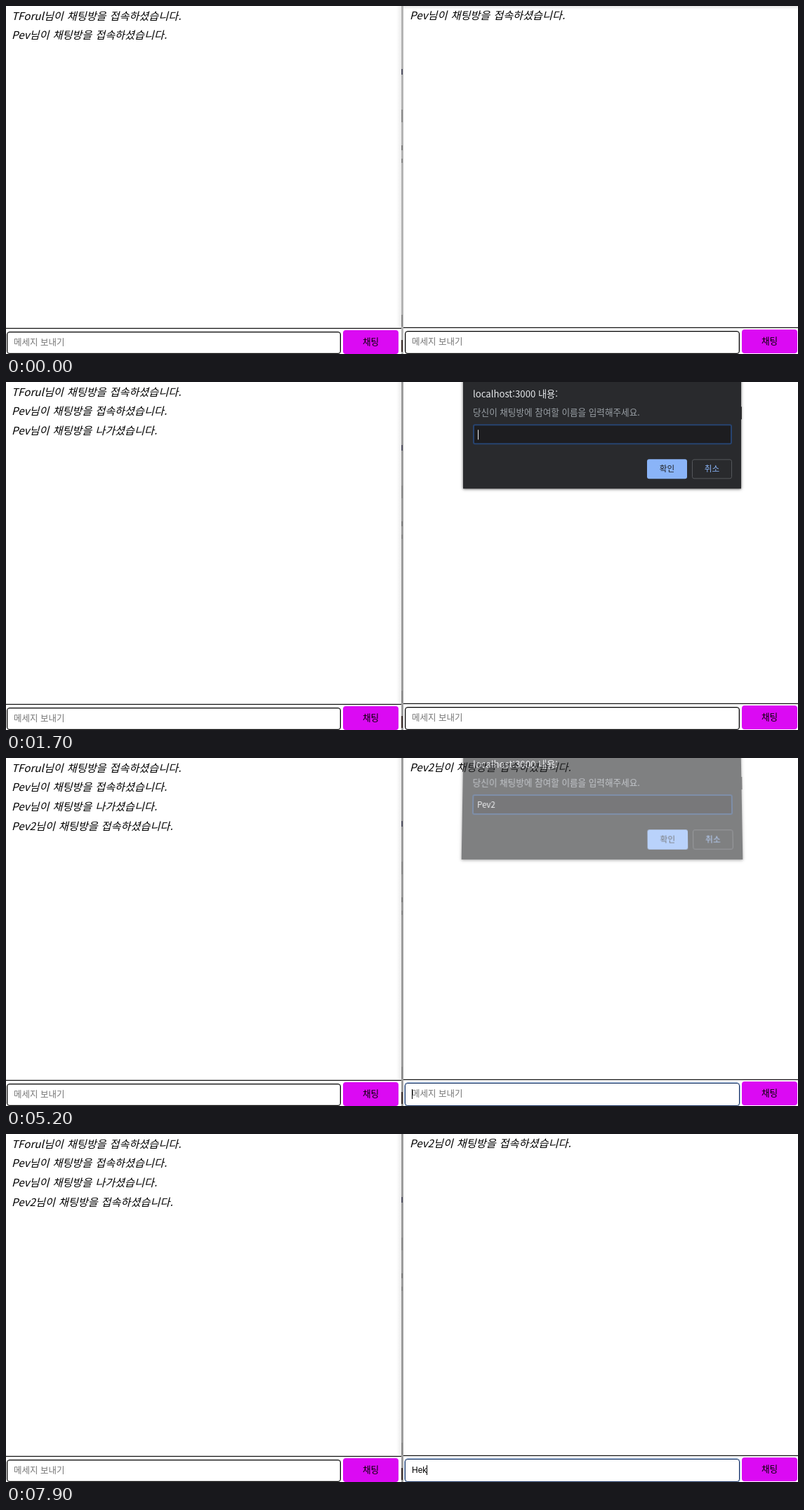
Write an HTML page that moves like this. It is 1128 px wide and 497 px high and loops after 8 s.

```html
<!DOCTYPE html>
<html lang="ko">
<head>
<meta charset="utf-8">
<title>채팅</title>
<style>
  html, body { margin: 0; width: 100%; height: 100%; overflow: hidden; background: #fff; }
  body { position: relative; font-family: "Noto Sans CJK KR", "Noto Sans CJK", "Noto Sans", sans-serif; }
  div { position: absolute; box-sizing: border-box; white-space: pre; }

  .pane { top: 0; height: 497px; }
  #left { left: 0; top: 1px; width: 564px; --field: 476px; --tall: 32px; }
  #right { left: 567px; width: 561px; --field: 477px; --tall: 33px; }
  .log { left: 8px; top: -1.5px; font: italic 15.2px/27.7px "Noto Sans CJK KR", "Noto Sans CJK", sans-serif; word-spacing: .04em; color: #000; }
  .rule { left: 0; top: 459px; width: 100%; height: 1px; background: #111; box-shadow: 0 -.5px #0006; }
  #right .rule { left: -1px; width: 562px; }
  .field { left: 1px; top: 464px; width: var(--field); height: var(--tall); border: 1px solid #000; border-radius: 4px; box-shadow: inset 0 0 0 .5px #0008; }
  .field.focus { border-color: #16305f; box-shadow: 0 0 0 .5px #4d7fc4; }
  .hint { left: 9px; top: 0; font-size: 12.5px; line-height: 28px; color: #757575; }
  .typed { left: 9px; top: 0; font: 12px/30px "Liberation Sans", Arial, sans-serif; color: #000; }
  .send { left: calc(var(--field) + 4px); top: 462px; width: 79px; height: 34px; border-radius: 4px; background: #db0af3; font-size: 12.6px; line-height: 32px; text-align: center; color: #000; }
  .caret { display: inline-block; width: 1px; height: 14px; margin-right: -1px; vertical-align: -3px; background: currentColor; }

  #edge { left: 556px; top: 0; width: 7px; height: 459px; background: linear-gradient(90deg, #fff, #ececec); }
  #bar { left: 563px; top: 0; width: 3px; height: 497px; }
  .speck { left: 563px; width: 2px; }
  #shade { left: 566px; top: 0; width: 562px; height: 5px; background: linear-gradient(#e6e6e6, #fff); }

  #dialog { left: 651px; top: -40px; width: 396px; height: 193px; background: #292a2d; box-shadow: 0 1px 4px #0009; transform-origin: 198px 60px; }
  #dialog .notch { left: 396px; top: 76px; width: 1px; height: 18px; background: #333; }
  #title { left: 14px; top: 48px; font-size: 13.2px; line-height: 20px; color: #e8eaed; }
  #ask { left: 14px; top: 74px; font-size: 12.6px; line-height: 20px; color: #9aa0a6; }
  #name { left: 14px; top: 101px; width: 369px; height: 29px; border: 2px solid #27436f; border-radius: 3px; background: #1d1d20; }
  #name div { left: 5px; top: 0; font-size: 11.4px; line-height: 24px; color: #e8eaed; }
  .key { top: 151px; width: 57px; height: 28px; border-radius: 3px; font-size: 11.6px; line-height: 26px; text-align: center; }
  #ok { left: 262px; background: #8ab4f8; color: #202124; line-height: 27px; }
  #cancel { left: 326px; border: 1px solid #54575b; color: #8ab4f8; line-height: 25px; }
</style>
</head>
<body>
<div id="left" class="pane"></div>
<div id="edge"></div>
<div id="bar"></div>
<div class="speck" style="top:90px;height:8px;background:#556"></div>
<div class="speck" style="top:148px;height:18px;background:#8c8c8c"></div>
<div class="speck" style="top:199px;height:7px;background:#808080"></div>
<div class="speck" style="top:218px;height:6px;background:#8a8a8a"></div>
<div class="speck" style="top:441px;height:17px;background:#8c8c8c"></div>
<div class="speck" style="top:477px;height:17px;background:#3a2c2a"></div>
<div id="right" class="pane"></div>
<div id="shade"></div>
<div id="dialog">
  <div class="notch"></div>
  <div id="title">localhost:3000 내용:</div>
  <div id="ask">당신이 채팅방에 참여할 이름을 입력해주세요.</div>
  <div id="name"><div></div></div>
  <div id="ok" class="key">확인</div>
  <div id="cancel" class="key">취소</div>
</div>
<script>
const LOOP = 8000;
const $ = s => document.querySelector(s);
const joined = n => `${n}님이 채팅방을 접속하셨습니다.`;
const exited = n => `${n}님이 채팅방을 나가셨습니다.`;

for (const id of ['#left', '#right']) {
  $(id).innerHTML = `<div class="log"></div><div class="rule"></div>
    <div class="field"><div class="hint">메세지 보내기</div><div class="typed"></div></div>
    <div class="send">채팅</div>`;
}

const history = [joined('TForul'), joined('Pev'), exited('Pev'), joined('Pev2')];
const leftLines = [[0, 2], [1500, 3], [5200, 4]];
const rightLog = [[0, joined('Pev')], [1500, ''], [5200, joined('Pev2')]];

// time, text, caret shown
const nameSteps = [
  [0, '', 1], [2100, '', 0], [2600, '', 1], [3000, 'P', 1], [3300, 'Pe', 1],
  [3500, 'Pev', 1], [3600, 'Pev2', 1], [4200, 'Pev2', 0], [4700, 'Pev2', 1], [5000, 'Pev2', 0]
];
const messageSteps = [
  [0, '', 0], [5200, '', 1], [5700, '', 0], [6300, '', 1], [6400, 'J', 1], [6900, 'J', 0],
  [7100, '', 1], [7400, 'H', 1], [7600, 'He', 1], [7900, 'Hek', 1]
];
// time, opacity, vertical shift, tilt
const dialogSteps = [
  [0, 0, 0, 0], [1600, .6, -6, 4], [1700, 1, -.7, 0], [1800, 1, 0, 0],
  [5100, .9, -3, 2], [5200, .6, -9, 5], [5300, .29, -15, 8.6], [5400, 0, 0, 0]
];

const at = (steps, t) => steps.findLast(s => s[0] <= t);
function setHTML(el, html) {
  if (el.shown !== html) el.innerHTML = el.shown = html;
}
const withCaret = ([, text, on]) => text + (on ? '<span class="caret"></span>' : '');

const leftLog = $('#left .log'), rightLogBox = $('#right .log');
const field = $('#right .field'), hint = $('#right .hint'), typed = $('#right .typed');
const nameText = $('#name div'), dialog = $('#dialog'), shade = $('#shade'), bar = $('#bar');

function render(t) {
  setHTML(leftLog, history.slice(0, at(leftLines, t)[1]).join('\n'));
  setHTML(rightLogBox, at(rightLog, t)[1]);

  const message = at(messageSteps, t);
  setHTML(typed, withCaret(message));
  hint.style.visibility = message[1] ? 'hidden' : 'visible';
  field.classList.toggle('focus', t >= 5200);

  setHTML(nameText, withCaret(at(nameSteps, t)));
  const [, opacity, dy, tilt] = at(dialogSteps, t);
  dialog.style.visibility = opacity ? 'visible' : 'hidden';
  dialog.style.opacity = opacity;
  dialog.style.transform = tilt
    ? `perspective(1000px) translateY(${dy}px) rotateX(${tilt}deg)`
    : dy ? `translateY(${dy}px)` : 'none';

  shade.style.visibility = t < 500 ? 'visible' : 'hidden';
  bar.style.background = t < 500 ? '#b4b4b4' : '#9c9c9c';
}

const start = performance.now();
function tick() {
  render((performance.now() - start) % LOOP);
  requestAnimationFrame(tick);
}
tick();
</script>
</body>
</html>
```
